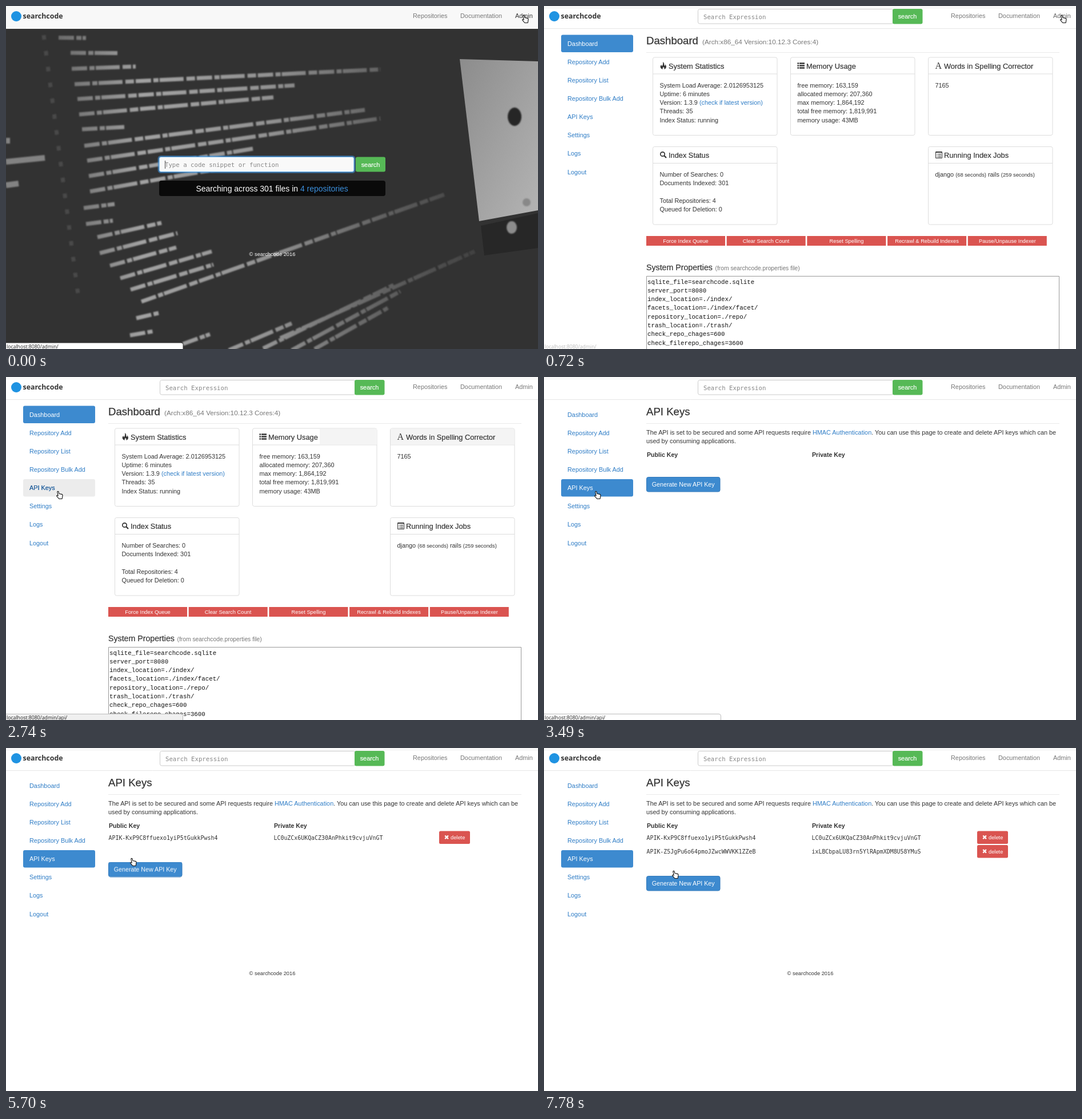
Recreate the animation shown at these times as an HTML page. Size 931 by 601 pixels, loop 8000 ms.

```html
<!DOCTYPE html>
<html lang="en">
<head>
<meta charset="utf-8">
<title>API keys walkthrough</title>
<style>
html, body { margin: 0; width: 100%; height: 100%; overflow: hidden; background: #fff; }
svg { display: block; width: 931px; height: 601px; font: 10.86px "Liberation Sans", Arial, sans-serif; fill: #333; }
text { white-space: pre; }
.link { fill: #2f7dc6; }
.grey { fill: #777; }
.white { fill: #fff; }
.blue { fill: #3d8acf; }
.green { fill: #56b956; }
.red { fill: #da5450; }
.mid { text-anchor: middle; }
.h1 { font-size: 18.6px; stroke: #333; stroke-width: .25px; }
.h2 { font-size: 12.8px; stroke: #333; stroke-width: .2px; }
.small { font-size: 9.3px; }
.bold { font-size: 10.6px; font-weight: 700; }
.brand { font: 700 12.4px "Open Sans", sans-serif; }
.field { font: 10.7px "DejaVu Sans Mono", monospace; fill: #888; }
.key { font: 9.92px "DejaVu Sans Mono", monospace; }
.props { font: 10.75px "Liberation Mono", monospace; fill: #111; }
.url { font: 8.7px "Open Sans", sans-serif; fill: #222; }
.box { fill: #fff; stroke: #ddd; }

/* every track is a hard-stepped 8 s loop */
.a { animation: 8s step-end infinite; }
.home { animation-name: home; }
.app { animation-name: app; }
.dash { animation-name: dash; }
.keys { animation-name: keys; }
.ring { animation-name: ring; }
.admin { animation-name: admin; }
.logo { animation-name: logo; }
.foot { animation-name: foot; }
.left { animation-name: left; }
.heads { animation-name: heads; }
.hover { animation-name: hover; }
.api { animation-name: api; }
.apibg { animation-name: apibg; }
.row1 { animation-name: row1; }
.row2 { animation-name: row2; }
.gen { animation-name: gen; }
.genbg { animation-name: genbg; }
.focus { animation-name: focus; }
.pos { animation-name: pos; }
.hand { animation-name: hand; }
.arrow { animation-name: arrow; }

@keyframes home { 0% { opacity: 1 } 9%, 100% { opacity: 0 } }
@keyframes app { 0% { opacity: 0 } 9%, 100% { opacity: 1 } }
@keyframes dash { 0% { opacity: 0 } 9% { opacity: 1 } 43.625%, 100% { opacity: 0 } }
@keyframes keys { 0% { opacity: 0 } 43.625%, 100% { opacity: 1 } }
@keyframes ring { 0% { opacity: 1 } 1.875% { opacity: .5 } 4.875%, 100% { opacity: 0 } }
@keyframes admin { 0% { fill: #333 } 9% { fill: #666 } 15.75%, 100% { fill: #777 } }
@keyframes logo { 0% { opacity: 1 } 43.625% { opacity: 0 } 45.5%, 100% { opacity: 1 } }
@keyframes foot { 0% { opacity: 0 } 45.5%, 100% { opacity: 1 } }
@keyframes left { 0% { opacity: 0 } 9% { opacity: .3 } 11.25%, 100% { opacity: 0 } }
@keyframes heads { 0% { opacity: 0 } 17.5%, 100% { opacity: 1 } }
@keyframes hover { 0% { opacity: 0 } 30.625% { opacity: .5 } 32.375%, 100% { opacity: 1 } }
@keyframes api { 0% { opacity: 0 } 32.375% { opacity: .6 } 34.25% { opacity: 1 } 45.5% { opacity: .3 } 48.125%, 100% { opacity: 0 } }
@keyframes apibg { 0% { fill: #f0f0f0 } 43.625%, 100% { fill: #fff } }
@keyframes row1 { 0% { opacity: 0 } 69%, 100% { opacity: 1 } }
@keyframes row2 { 0% { opacity: 0 } 95.5%, 100% { opacity: 1 } }
@keyframes gen {
  0% { transform: none }
  69% { transform: translateY(24.5px) }
  95.5%, 100% { transform: translateY(49px) }
}
@keyframes genbg {
  0% { fill: #3d8acf } 55.625% { fill: #367cbc } 57.5% { fill: #2f70aa }
  69% { fill: #3d8acf } 82.375% { fill: #367cbc } 84.25% { fill: #2f70aa }
  95.5%, 100% { fill: #3d8acf }
}
@keyframes focus { 0% { opacity: 0 } 66.75% { opacity: .6 } 69% { opacity: 0 } 93.625% { opacity: .6 } 95.5%, 100% { opacity: 0 } }
@keyframes pos {
  0% { transform: translate(909px, 23px) }
  15.75% { transform: translate(812px, 58px) }
  17.5% { transform: translate(620px, 110px) }
  19.375% { transform: translate(529px, 126px) }
  23.125% { transform: translate(330px, 152px) }
  25% { transform: translate(196px, 170px) }
  28.75% { transform: translate(160px, 180px) }
  30.625% { transform: translate(116px, 194px) }
  32.375% { transform: translate(97px, 206px) }
  34.25% { transform: translate(94px, 207px) }
  51.875% { transform: translate(110px, 200px) }
  53.75% { transform: translate(160px, 197px) }
  55.625% { transform: translate(212px, 200px) }
  57.5% { transform: translate(223px, 200px) }
  80.5% { transform: translate(225px, 208px) }
  82.375% { transform: translate(229px, 218px) }
  84.25%, 100% { transform: translate(230px, 222px) }
}
@keyframes hand { 0% { opacity: 1 } 15.75% { opacity: 0 } 32.375% { opacity: 1 } 51.875% { opacity: 0 } 55.625%, 100% { opacity: 1 } }
@keyframes arrow { 0% { opacity: 0 } 15.75% { opacity: 1 } 32.375% { opacity: 0 } 51.875% { opacity: 1 } 55.625%, 100% { opacity: 0 } }
</style>
</head>
<body>
<svg viewBox="0 0 931 601">
  <defs>
    <linearGradient id="code" gradientUnits="userSpaceOnUse" x1="90" x2="830" y1="0" y2="0">
      <stop offset="0" stop-color="#6a6a6a"/><stop offset=".2" stop-color="#a2a2a2"/>
      <stop offset=".5" stop-color="#929292"/><stop offset=".8" stop-color="#5c5c5c"/>
      <stop offset="1" stop-color="#404040"/>
    </linearGradient>
    <linearGradient id="screen" x1="0" x2="1" y1="0" y2="1">
      <stop offset="0" stop-color="#8c8c8c"/><stop offset="1" stop-color="#b4b4b4"/>
    </linearGradient>
    <filter id="soft"><feGaussianBlur stdDeviation="1.3"/></filter>
    <g id="delete">
      <rect class="red" x="758" y="145.5" width="54" height="22.5" rx="2.5"/>
      <path d="M768.3 153.5l5.6 5.6m0-5.6l-5.6 5.6" stroke="#fff" stroke-width="2.3"/>
      <text class="white small" x="778" y="160">delete</text>
    </g>
    <g id="panel">
      <rect class="box" x=".5" y=".5" width="217.5" height="136.5" rx="3"/>
      <path d="M0 29.5h218" stroke="#ddd"/>
    </g>
  </defs>

  <rect width="931" height="601" class="white"/>
  <rect width="931" height="5" fill="#f8f8f8"/>

  <g class="a home">
    <rect width="931" height="40" fill="#f8f8f8"/>
    <rect y="40" width="931" height="561" fill="#323232"/>
    <!-- blurred photo backdrop -->
    <g fill="none" filter="url(#soft)">
      <path d="M66 51L126 505" stroke="#484848" stroke-width="7" stroke-dasharray="8 20"/>
      <path d="M0 273L68 266M0 236h7M0 314L22 311" stroke="#828282" stroke-width="10"/>
      <g stroke="url(#code)" stroke-width="7" stroke-dasharray="27 4 9 2 42 5 15 3">
        <path d="M92 55.5L140 56M113 82L195 82.5M115 110L227 106M120 137L655 111M125 163L505 139M128 190L468 160M133 216L207 212M137 245L628 182M142 271L655 197M145 298L432 250M147 325L390 282"/>
        <path d="M136 354L190 347M140 382L187 376M160 405L272 380M164 433L300 398M182 455L298 423M200 477L360 430M218 497L363 453M237 518L768 330M228 547L267 538M217 577L257 570M310 592L357 575"/>
        <path d="M390 603L500 556M450 600L680 488M480 582L820 430M500 603L690 500M540 601L670 528"/>
      </g>
    </g>
    <path d="M794 93L931 97V358L828 377z" fill="url(#screen)"/>
    <path d="M831 385L931 363V424L837 437z" fill="#272727"/>
    <g filter="url(#soft)">
      <ellipse cx="890" cy="194" rx="12" ry="16" fill="#262626"/>
      <circle cx="911" cy="344" r="7" fill="#888"/>
      <ellipse cx="885" cy="388" rx="9" ry="11" fill="#8c8c8c"/>
    </g>

    <rect x="268" y="264.5" width="341" height="26" rx="3" fill="#f9f9f9"/>
    <text class="field" x="278" y="281.5">Type a code snippet or function</text>
    <g class="a ring">
      <rect x="267" y="263.5" width="343" height="28" rx="4" fill="none" stroke="#3f8fd8" stroke-width="3" opacity=".55"/>
      <rect x="268" y="264.5" width="341" height="26" rx="3" fill="none" stroke="#66afe9"/>
      <path d="M278.5 271v14" stroke="#444"/>
    </g>
    <rect class="green" x="612" y="264.5" width="52" height="26" rx="3"/>
    <text class="white mid" x="638" y="281.5" stroke="#fff" stroke-width=".2">search</text>
    <rect x="268" y="306" width="396" height="27" rx="4" fill="#0a0a0a"/>
    <text class="white" x="332.5" y="324.5" font-size="13.97">Searching across 301 files in <tspan fill="#3b8fdc">4 repositories</tspan></text>
    <text class="white small mid" x="466" y="437.5">© searchcode 2016</text>
    <path d="M0 590.5H306q3.5 0 3.5 3.5V601H0z" fill="#fff"/>
    <text class="url" x="1" y="600">localhost:8080/admin/</text>
  </g>

  <!-- shared navigation -->
  <g class="a logo">
    <circle cx="18" cy="18" r="9" fill="#1f93e2"/>
    <text class="brand" x="29.5" y="22">searchcode</text>
  </g>
  <g class="grey">
    <text x="712" y="21">Repositories</text>
    <text x="795" y="21">Documentation</text>
    <text class="a admin" x="891" y="21">Admin</text>
  </g>

  <g class="a app">
    <path d="M0 39.5H931" stroke="#e7e7e7"/>
    <rect x="269.5" y="5.5" width="342" height="25.5" rx="3" fill="#fff" stroke="#ccc"/>
    <text class="field" x="279" y="22.5">Search Expression</text>
    <rect class="green" x="610" y="5" width="52.5" height="26.5" rx="3"/>
    <text class="white mid" x="636" y="22.3" stroke="#fff" stroke-width=".2">search</text>
    <path d="M179 81.5H902" stroke="#eaeaea"/>

    <g class="a dash">
      <rect class="a hover" x="30" y="179" width="126" height="30.5" rx="3" fill="#ececec"/>
    </g>
    <g class="link">
      <text x="41" y="70">Dashboard</text>
      <text x="41" y="102">Repository Add</text>
      <text x="41" y="134">Repository List</text>
      <text x="41" y="166">Repository Bulk Add</text>
      <text x="41" y="198">API Keys</text>
      <text x="41" y="230">Settings</text>
      <text x="41" y="262">Logs</text>
      <text x="41" y="294.5">Logout</text>
    </g>
  </g>

  <g class="a dash">
    <rect class="blue" x="30" y="50.5" width="126" height="30.5" rx="3"/>
    <text class="white" x="41" y="70">Dashboard</text>
    <text class="a hover" x="41" y="198" fill="#235a92">API Keys</text>
    <text class="h1" x="179" y="67.3">Dashboard</text>
    <text class="grey" x="277" y="67" font-size="11.75">(Arch:x86_64 Version:10.12.3 Cores:4)</text>

    <use href="#panel" x="190" y="89.5"/>
    <use href="#panel" x="431" y="89.5"/>
    <use href="#panel" x="672" y="89.5"/>
    <use href="#panel" x="190" y="246"/>
    <use href="#panel" x="672" y="246"/>
    <path class="a heads" d="M549 90.5h100v28h-100zM673 90.5h216.5v28h-216.5z" fill="#f4f4f4"/>

    <!-- panel icons -->
    <path d="M208 98c4 3 1 5 3.500 7 .8-1 .6-2 .4-3 3 3 3 7-1.400 9 .6-2-.5-3-1.500-4.500-.6 2-2.200 2.500-1.300 4.500-5-2-5-6-2-8 0 1 .1 2 .7 2.500 1.600-2 2.300-4 1.600-7.500z"/>
    <path d="M443.500 100.500h2.500m1 0h9m-12.500 4h2.500m1 0h9m-12.500 4h2.500m1 0h9" stroke="#333" stroke-width="2.600"/>
    <text x="684.500" y="109.500" font-size="16" style="font-family: 'Liberation Serif', serif">A</text>
    <g fill="none" stroke="#333">
      <circle cx="207.500" cy="259.500" r="3.700" stroke-width="1.700"/>
      <path d="M210.300 262.300l3.700 3.700" stroke-width="2.300"/>
      <path d="M685.500 255.500h11v11h-11zM685.500 256.500h11"/>
      <path d="M687.300 259.500h1.200m1 0h5.500m-7.700 2.500h1.200m1 0h5.500m-7.700 2.500h1.200m1 0h5.500"/>
    </g>
    <g class="h2">
      <text x="218" y="109.500">System Statistics</text>
      <text x="459" y="109.500">Memory Usage</text>
      <text x="700" y="109.500">Words in Spelling Corrector</text>
      <text x="218" y="266">Index Status</text>
      <text x="700" y="266">Running Index Jobs</text>
    </g>
    <text x="202.500" y="142.500">System Load Average: 2.0126953125</text>
    <text x="202.500" y="157.800">Uptime: 6 minutes</text>
    <text x="202.500" y="173">Version: 1.3.9 <tspan class="link">(check if latest version)</tspan></text>
    <text x="202.500" y="188.300">Threads: 35</text>
    <text x="202.500" y="203.500">Index Status: running</text>
    <text x="443.500" y="142.500">free memory: 163,159</text>
    <text x="443.500" y="157.800">allocated memory: 207,360</text>
    <text x="443.500" y="173">max memory: 1,864,192</text>
    <text x="443.500" y="188.300">total free memory: 1,819,991</text>
    <text x="443.500" y="203.500">memory usage: 43MB</text>
    <text x="684.500" y="142.500">7165</text>
    <text x="202.500" y="299">Number of Searches: 0</text>
    <text x="202.500" y="314.300">Documents Indexed: 301</text>
    <text x="202.500" y="345">Total Repositories: 4</text>
    <text x="202.500" y="360.300">Queued for Deletion: 0</text>
    <text x="684.500" y="299">django <tspan class="small">(68 seconds)</tspan> rails <tspan class="small">(259 seconds)</tspan></text>

    <path class="red" d="M179 403h138v17h-138zM319.700 403h138v17h-138zM460.400 403h138v17h-138zM601.100 403h138v17h-138zM741.800 403h138v17h-138z"/>
    <g class="white small mid">
      <text x="248" y="414.800">Force Index Queue</text>
      <text x="388.500" y="414.800">Clear Search Count</text>
      <text x="529.500" y="414.800">Reset Spelling</text>
      <text x="670" y="414.800">Recrawl &amp; Rebuild Indexes</text>
      <text x="811" y="414.800">Pause/Unpause Indexer</text>
    </g>

    <text class="h2" x="179" y="463" style="font-size: 14.200px">System Properties</text>
    <text class="grey" x="299.500" y="463" font-size="10.300">(from searchcode.properties file)</text>
    <path d="M179.500 602V473.500H901.500V602" fill="none" stroke="#999"/>
    <g class="props">
      <text x="181" y="486.500">sqlite_file=searchcode.sqlite</text>
      <text x="181" y="501.800">server_port=8080</text>
      <text x="181" y="517">index_location=./index/</text>
      <text x="181" y="532.300">facets_location=./index/facet/</text>
      <text x="181" y="547.600">repository_location=./repo/</text>
      <text x="181" y="563">trash_location=./trash/</text>
      <text x="181" y="578.200">check_repo_chages=600</text>
      <text x="181" y="593.500">check_filerepo_chages=3600</text>
    </g>
    <text class="url a left" x="1" y="600">localhost:8080/admin/</text>
  </g>

  <g class="a keys">
    <rect class="blue" x="30" y="179" width="126" height="30.500" rx="3"/>
    <text class="white" x="41" y="198">API Keys</text>
    <text class="h1" x="179" y="67.300">API Keys</text>
    <text x="179" y="101">The API is set to be secured and some API requests require <tspan class="link">HMAC Authentication</tspan>. You can use this page to create and delete API keys which can be</text>
    <text x="179" y="116.300">used by consuming applications.</text>
    <text class="bold" x="180" y="140">Public Key</text>
    <text class="bold" x="469" y="140">Private Key</text>
    <g class="a row1">
      <text class="key" x="179.500" y="160.500">APIK-KxP9C8ffuexo1yiP5tGukkPwsh4</text>
      <text class="key" x="468.500" y="160.500">LC0uZCx6UKQaCZ30AnPhkit9cvjuVnGT</text>
      <use href="#delete"/>
    </g>
    <g class="a row2">
      <text class="key" x="179.500" y="185">APIK-Z5JgPu6o64pmoJZwcWWVKK1ZZeB</text>
      <text class="key" x="468.500" y="185">ixLBCbpaLU83rn5YlRApmXDM8U58YMuS</text>
      <use href="#delete" y="24.500"/>
    </g>
    <g class="a gen">
      <rect class="a focus" x="178" y="174" width="131" height="28" rx="4" fill="none" stroke="#6fa8dc" stroke-width="2"/>
      <rect class="a genbg" x="179.500" y="175.500" width="128.500" height="25.500" rx="3" stroke="#3279ba"/>
      <text class="white mid" x="243.700" y="192" font-size="10.700">Generate New API Key</text>
    </g>
    <text class="a foot small mid" x="466" y="397.500">© searchcode 2016</text>
  </g>

  <g class="a api">
    <path class="a apibg" d="M-1 590.500H306q3.500 0 3.500 3.500V602H-1z" stroke="#bbb"/>
    <text class="url" x="1" y="600">localhost:8080/admin/api/</text>
  </g>

  <g class="a pos">
    <path class="a hand" d="M-4.200-5.500c0-1.500 2.200-1.500 2.400 0l.6 3 4.500.9c1.300.3 1.900 1.200 1.700 2.500l-.9 5.600h-5.300l-3.900-4.600c-.7-1.200.8-2.200 1.700-1.300l.6.600z" fill="#fff" stroke="#111" stroke-width="1.100" stroke-linejoin="round"/>
    <path class="a arrow" d="M0 0V11.500L2.700 9 4.500 13 6.300 12.200 4.600 8.300H8.200z" fill="#111" stroke="#fff" stroke-width=".8"/>
  </g>
</svg>
</body>
</html>
```
